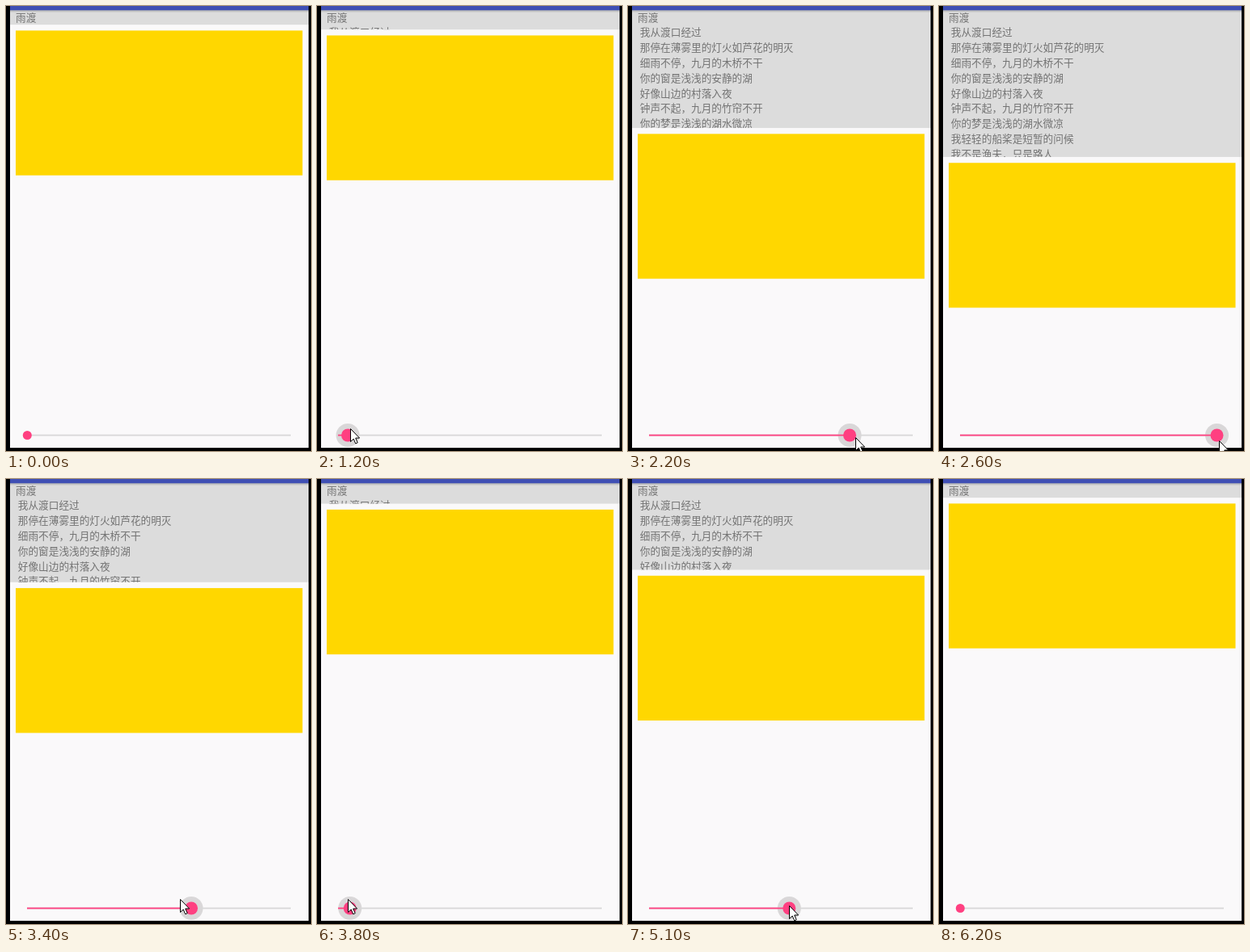
An HTML page that plays this animation: 377x551 px, repeating every 6.7 s.

```html
<!DOCTYPE html>
<html lang="zh-CN">
<head>
<meta charset="utf-8">
<title>Slider panel</title>
<style>
  html, body { margin: 0; width: 100%; height: 100%; overflow: hidden; background: #000; }
  svg { display: block; }
  text { font: 12.65px "Noto Sans CJK SC", "Noto Sans CJK", sans-serif; fill: #737373; white-space: pre; }
</style>
</head>
<body>
<svg width="377" height="551" viewBox="0 0 377 551">
  <defs>
    <linearGradient id="shade" x1="0" y1="0" x2="0" y2="1">
      <stop offset="0" stop-color="#000" stop-opacity=".2"/>
      <stop offset="1" stop-color="#000" stop-opacity="0"/>
    </linearGradient>
  </defs>
  <rect x="5" width="369" height="547" fill="#dcdcdc"/>
  <g id="poem"></g>
  <g id="sheet">
    <rect x="5" width="369" height="540" fill="#faf9fa"/>
    <rect x="12" y="7.3" width="354.5" height="179.3" fill="#ffd700"/>
  </g>
  <rect x="5" width="369" height="5.3" fill="#3f4fb4"/>
  <rect x="5" y="5.3" width="369" height="3" fill="url(#shade)"/>
  <circle id="halo" cy="531.5" r="14.5" fill="#d9d7d8"/>
  <rect x="26" y="530.6" width="326" height="1.8" fill="#d8d7d8"/>
  <rect id="fill" x="26" y="530.6" height="1.8" fill="#ff4081"/>
  <circle id="thumb" cy="531.5" fill="#ff4081"/>
  <path d="M0 547H377V551H0Z M0 0H5V551H0Z M374 0H377V551H374Z"/>
  <path id="cursor" d="M.5.5V16.5L4.2 13 6.7 18.8 9.2 17.7 6.7 12H11.6Z" fill="#fff" stroke="#000"/>
</svg>
<script>
const LOOP = 6700, STEP = 100;
const MIN_X = 26, CLOSED = 23.1, RATIO = 0.5165;
const ENTER = 100, ARRIVE = 700, PRESS = 1100, RELEASE = 6100, LEAVE = 6200;

const lines = [
  '雨渡',
  ' 我从渡口经过',
  ' 那停在薄雾里的灯火如芦花的明灭',
  ' 细雨不停,九月的木桥不干',
  ' 你的窗是浅浅的安静的湖',
  ' 好像山边的村落入夜',
  ' 钟声不起,九月的竹帘不开',
  ' 你的梦是浅浅的湖水微凉',
  ' 我轻轻的船桨是短暂的问候',
  ' 我不是渔夫,只是路人'
].map(s => s.replace(',', '\uff0c'));

// Each drag moves the thumb to x; lead is how far the pointer runs from it midway.
const drags = [
  { start: 980, end: 2790, x: 352, soft: 1, lead: 9, y: [522, 538] },
  { start: 3100, end: 3850, x: MIN_X, soft: 0.4, lead: -14, y: [520, 520] },
  { start: 4300, end: 5100, x: 199, soft: 0.4, lead: 44, y: [520, 528] },
  { start: 5300, end: 5800, x: MIN_X, soft: 0.4, lead: -10, y: [528, 527] }
];

const $ = id => document.getElementById(id);
const [poem, sheet, halo, fill, thumb, cursor] =
  ['poem', 'sheet', 'halo', 'fill', 'thumb', 'cursor'].map($);

lines.forEach((line, i) => {
  const el = document.createElementNS('http://www.w3.org/2000/svg', 'text');
  el.setAttribute('x', 12);
  el.setAttribute('y', 18.7 + i * 18.78);
  el.textContent = line;
  poem.append(el);
});

const mix = (a, b, k) => a + (b - a) * k;
const progress = (t, a, b) => Math.min(1, Math.max(0, (t - a) / (b - a)));
// Blends linear motion (soft 0) with a sine ease (soft 1).
const ease = (u, soft) => mix(u, (1 - Math.cos(Math.PI * u)) / 2, soft);

function pose(t) {
  const i = drags.findLastIndex(d => d.start < t);
  if (i < 0) {
    const k = ease(progress(t, ENTER, ARRIVE), 1);
    return { x: MIN_X, tipX: mix(249, 30, k), tipY: mix(281, 521, k) };
  }
  const d = drags[i], u = progress(t, d.start, d.end), k = ease(u, d.soft);
  const x = mix(i ? drags[i - 1].x : MIN_X, d.x, k);
  return { x, tipX: x + d.lead * Math.sin(Math.PI * u), tipY: mix(...d.y, k) };
}

const show = (el, on) => el.setAttribute('visibility', on ? 'visible' : 'hidden');
const move = (el, x, y) => el.setAttribute('transform', `translate(${x} ${y})`);

function draw(t) {
  const { x, tipX, tipY } = pose(t);
  const pressed = t >= PRESS && t < RELEASE;
  move(sheet, 0, CLOSED + (x - MIN_X) * RATIO);
  fill.setAttribute('width', x - MIN_X);
  halo.setAttribute('cx', x + 0.3);
  thumb.setAttribute('cx', x + 0.3);
  thumb.setAttribute('r', pressed ? 8 : 5.5);
  show(halo, pressed);
  show(cursor, t >= ENTER && t < LEAVE);
  if (t < RELEASE) move(cursor, Math.round(tipX), Math.round(tipY));
  else move(cursor, 178, 411);
}

// The picture advances in 100 ms ticks.
const start = performance.now();
function tick() {
  const t = (performance.now() - start) % LOOP;
  draw(Math.floor(t / STEP) * STEP);
  requestAnimationFrame(tick);
}
tick();
</script>
</body>
</html>
```
